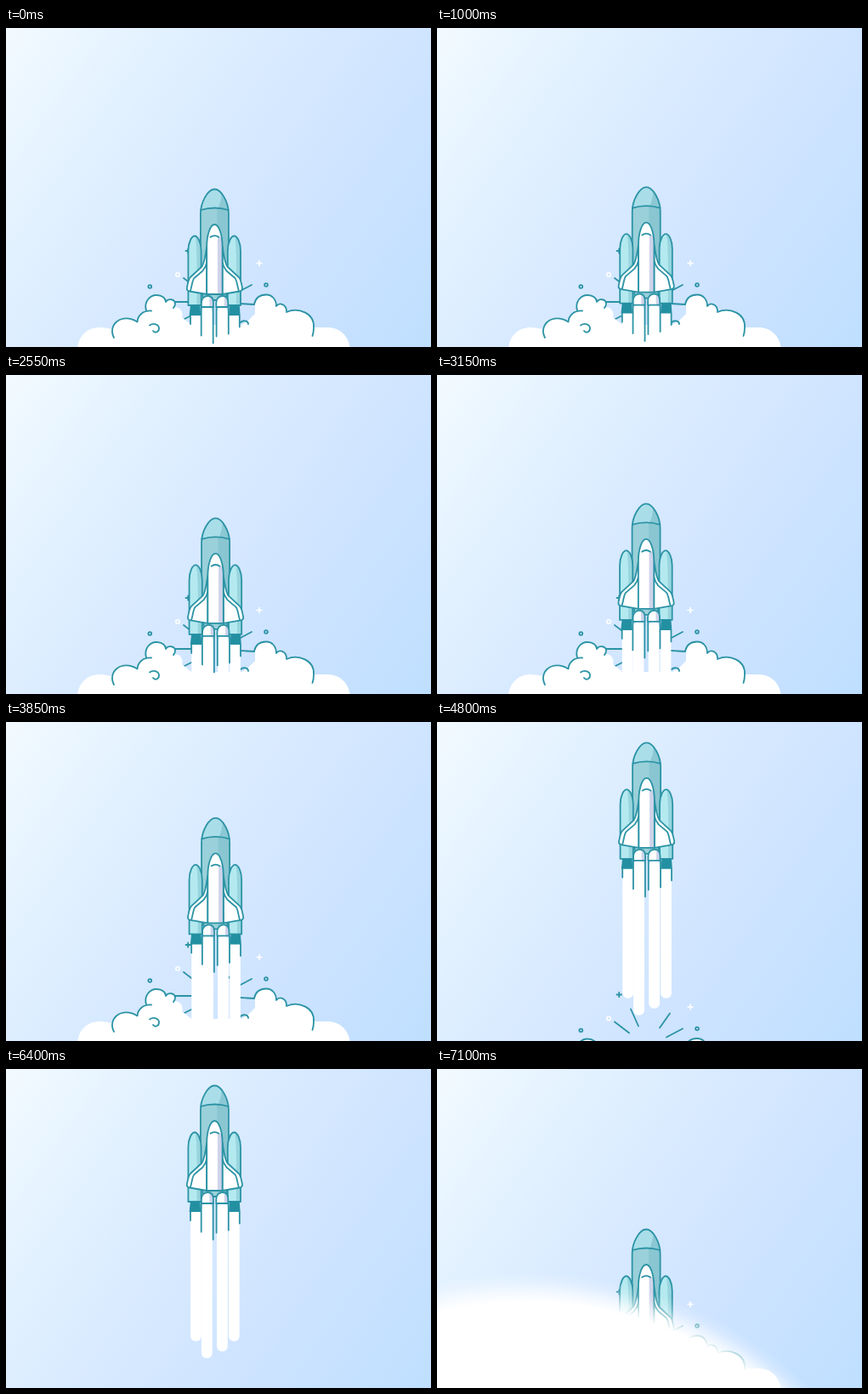
An HTML page for the animation above (7150 ms loop, 500 by 375 pixels).

```html
<!DOCTYPE html>
<html lang="en">
<head>
<meta charset="utf-8">
<title>Rocket launch</title>
<style>
  html, body { margin: 0; width: 100%; height: 100%; overflow: hidden; }
  svg { display: block; width: 100vw; height: 100vh; }
  .line { fill: none; stroke: #2b93a5; stroke-width: 1.8; stroke-linecap: round; stroke-linejoin: round; }
  .white { fill: #fff; }
  .spark { fill: none; stroke: #fff; stroke-width: 1.6; stroke-linecap: round; }
</style>
</head>
<body>
<svg viewBox="0 0 500 375" preserveAspectRatio="none">
  <defs>
    <linearGradient id="sky" gradientUnits="userSpaceOnUse" x1="0" y1="0" x2="512" y2="356">
      <stop offset="0" stop-color="#f3faff"/>
      <stop offset=".17" stop-color="#e7f4ff"/>
      <stop offset=".45" stop-color="#d8eaff"/>
      <stop offset=".66" stop-color="#cfe4ff"/>
      <stop offset=".85" stop-color="#c6e1ff"/>
      <stop offset="1" stop-color="#bfdfff"/>
    </linearGradient>
    <radialGradient id="soft">
      <stop offset=".925" stop-color="#fff"/>
      <stop offset=".95" stop-color="#fff" stop-opacity=".65"/>
      <stop offset=".975" stop-color="#fff" stop-opacity=".22"/>
      <stop offset="1" stop-color="#fff" stop-opacity="0"/>
    </radialGradient>
    <clipPath id="tankClip"><path id="tankShape" d="M229.5 320V218C229.5 205 238 189.5 246 189.5S262.5 205 262.5 218V320Z"/></clipPath>
    <clipPath id="bodyClip"><path id="bodyShape" d="M236.8 313V257C236.8 243 241 231 246 231S255.2 243 255.2 257V313Z"/></clipPath>
    <clipPath id="boosterClip"><path id="boosterShape" d="M215 326V262C215 252 219 244.5 222.6 244.5S230.2 252 230.2 262V326Z"/></clipPath>
    <g id="booster">
      <use href="#boosterShape" fill="#b4e9f0"/>
      <path clip-path="url(#boosterClip)" fill="#98d5de" d="M223 244Q226 252 225 326H231V244Z"/>
      <use href="#boosterShape" class="line"/>
      <path fill="#2390a2" d="M217.5 326H229L229.8 338H216.2Z"/>
    </g>
    <g id="wing">
      <path class="line" style="fill:#fff" d="M236.8 257C234.5 270 234.5 275 231 280.5L217.5 293C214.8 296 214.5 301 213.5 305C213 307.5 214 309 216.5 309.5L236.8 313Z"/>
      <path class="line" d="M236.8 275.5C236 280 235 282 232 285.5L222 294C219.5 297 219.5 303 217.5 309"/>
    </g>
    <g id="pod">
      <path fill="#fff" d="M230.5 328V323C230.5 318 234 315 238 315S244.5 318 244.5 323V328Z"/>
      <path fill="#cfd3ea" d="M240 315.5Q244.5 317 244.5 323V328H240Z"/>
      <path class="line" d="M230.5 328V323C230.5 318 234 315 238 315S244.5 318 244.5 323V328Z"/>
    </g>
  </defs>

  <rect width="500" height="375" fill="url(#sky)"/>
  <g id="streaks"></g>

  <g id="ground">
    <path class="line" d="M209 294L226 307M228 279L237 299M274 284L262 301M270 312L289 302M198 322H218M275 324L292 325M206 344L218 338"/>
    <path class="line" d="M211.5 262H217M214.2 259.3V264.7"/>
    <path class="spark" d="M295 276.5H301M298 273.5V279.5"/>
    <circle class="spark" cx="202" cy="290" r="2.2"/>
    <circle class="line" cx="169.3" cy="304" r="1.9"/>
    <circle class="line" cx="306" cy="302" r="1.9"/>
    <path class="white" d="M84 380C84 362 96 351 112 352L126 354C126 338 146 338 155 346C156 338 160 334 165 332C162 322 169 314 177 314C184 314 188 318 188 322C191 317 199 319 199 324L198 328C205 328 209 334 207 340L218 349H277L285 344L293 336V324C295 316 300 313.5 306 313.5C313 313.5 318 319 318 327C322 322 330 325 330 334C344 328 363 335 362 352H376C394 351 405 364 405 380Z"/>
    <path class="line" d="M127 364C119 349 136 334 154.5 345.5C155 338 161 332 171 332.5M165 332C162 322 169 314 177 314C184 314 188 318 188 322C191 317 199 319 199 324Q199 327 197 329"/>
    <path class="line" d="M169 349.5C174 346 180 349 180 353C180 358 175 359 173 356M276 346C279 343 285 344 285 348"/>
    <path class="line" d="M292 324.5C294 316 300 313.5 306 313.5C313 313.5 318 319 318 327C322 322 330 325 330 333M330 334C344 328 363 335 362 352Q362 358 360.5 362"/>
  </g>

  <g id="rocket">
    <g id="trails"></g>
    <use href="#tankShape" fill="#9ad0d9"/>
    <path clip-path="url(#tankClip)" fill="#a9dee9" d="M228 213Q246 209 264 213V188H228Z"/>
    <path clip-path="url(#tankClip)" fill="#87c5d0" fill-opacity=".85" d="M254 188Q255 204 249 213V320H264V188Z"/>
    <path class="line" d="M229.8 214Q246 209 262.2 214"/>
    <use href="#tankShape" class="line"/>
    <use href="#booster"/>
    <use href="#booster" transform="translate(46.4)"/>
    <path class="line" d="M232 316V312M260 316V312"/>
    <use href="#wing"/>
    <use href="#wing" transform="matrix(-1 0 0 1 492 0)"/>
    <use href="#bodyShape" class="white"/>
    <rect clip-path="url(#bodyClip)" x="249.5" y="246" width="7" height="70" fill="#cfd3ea"/>
    <use href="#bodyShape" class="line"/>
    <path class="line" d="M241 245.8Q246 242.4 251 245.8"/>
    <use href="#pod"/>
    <use href="#pod" transform="translate(17.4)"/>
    <path id="jets" class="line" stroke-linecap="butt"/>
  </g>
  <circle id="cover" r="478" fill="url(#soft)"/>
</svg>
<script>
  const LOOP = 7150, STEP = 50;
  const LIFT_TIME = 5200, LIFT_HEIGHT = 170;
  const COVER_START = 6800, COVER_FULL = 6950, COVER_END = 7100;
  const byId = id => document.getElementById(id);
  const ground = byId("ground"), rocket = byId("rocket"), cover = byId("cover");

  function add(parent, tag, attrs) {
    const node = document.createElementNS("http://www.w3.org/2000/svg", tag);
    for (const key in attrs) node.setAttribute(key, attrs[key]);
    return parent.appendChild(node);
  }

  // x, top, bottom
  [[217.7, 332, 490], [230.5, 328, 510], [248.6, 328, 502], [262.5, 332, 490]].forEach(([x, top, bottom]) =>
    add(byId("trails"), "rect", { x, y: top, width: 12.8, height: bottom - top, rx: 6, fill: "#fff" }));

  byId("jets").setAttribute("d",
    [[217.6, 338, 348], [230.3, 328, 361.5], [244.3, 328, 370.5], [248.2, 328, 362.5], [262.4, 328, 359.5], [275.4, 338, 351.5]]
      .map(([x, top, bottom]) => `M${x} ${top}V${bottom}`).join(""));

  // x, first y, start time
  const streaks = [[25, 60, 5000], [382, 110, 5050], [110, 150, 5100], [330, 40, 5150], [399, -60, 5300], [62, -40, 5350]]
    .map(([x, y, start]) => ({
      y, start,
      node: add(byId("streaks"), "rect", { x: x - 1, width: 2, rx: 1, fill: "#fff", opacity: .7 })
    }));

  // cubic bezier (1, 0, .69, 1), solved for its parameter by bisection
  function liftEase(p) {
    let low = 0, high = 1;
    for (let i = 0; i < 24; i++) {
      const s = (low + high) / 2, r = 1 - s;
      if (3 * s * r * r + 2.07 * s * s * r + s ** 3 < p) low = s; else high = s;
    }
    return low * low * (3 - 2 * low);
  }

  function draw(t) {
    const restarted = t >= COVER_FULL;
    const lift = restarted ? 1 : LIFT_HEIGHT * liftEase(Math.min(1, t / LIFT_TIME));
    const shake = -0.6 * Math.cos(2 * Math.PI * t * 34 / 6400);
    rocket.setAttribute("transform", `translate(${shake} ${-lift})`);

    const drop = restarted ? 0 : 58.5 * (Math.max(0, t - 3900) / 900) ** 2;
    ground.setAttribute("transform", `translate(0 ${drop})`);

    for (const { y, start, node } of streaks) {
      const travel = Math.max(0, t - start) * 0.65;
      const length = Math.min(45, travel);
      node.setAttribute("y", y + travel - length);
      node.setAttribute("height", restarted ? 0 : length);
    }

    const p = (t - COVER_START) / (COVER_END - COVER_START);
    cover.setAttribute("visibility", p >= 0 ? "visible" : "hidden");
    cover.setAttribute("cx", 206 - 100 * p);
    cover.setAttribute("cy", -290 + 1006 * p);
  }

  const began = performance.now();
  function tick() {
    const t = (performance.now() - began) % LOOP;
    draw(Math.floor(t / STEP) * STEP);
    requestAnimationFrame(tick);
  }
  tick();
</script>
</body>
</html>
```
